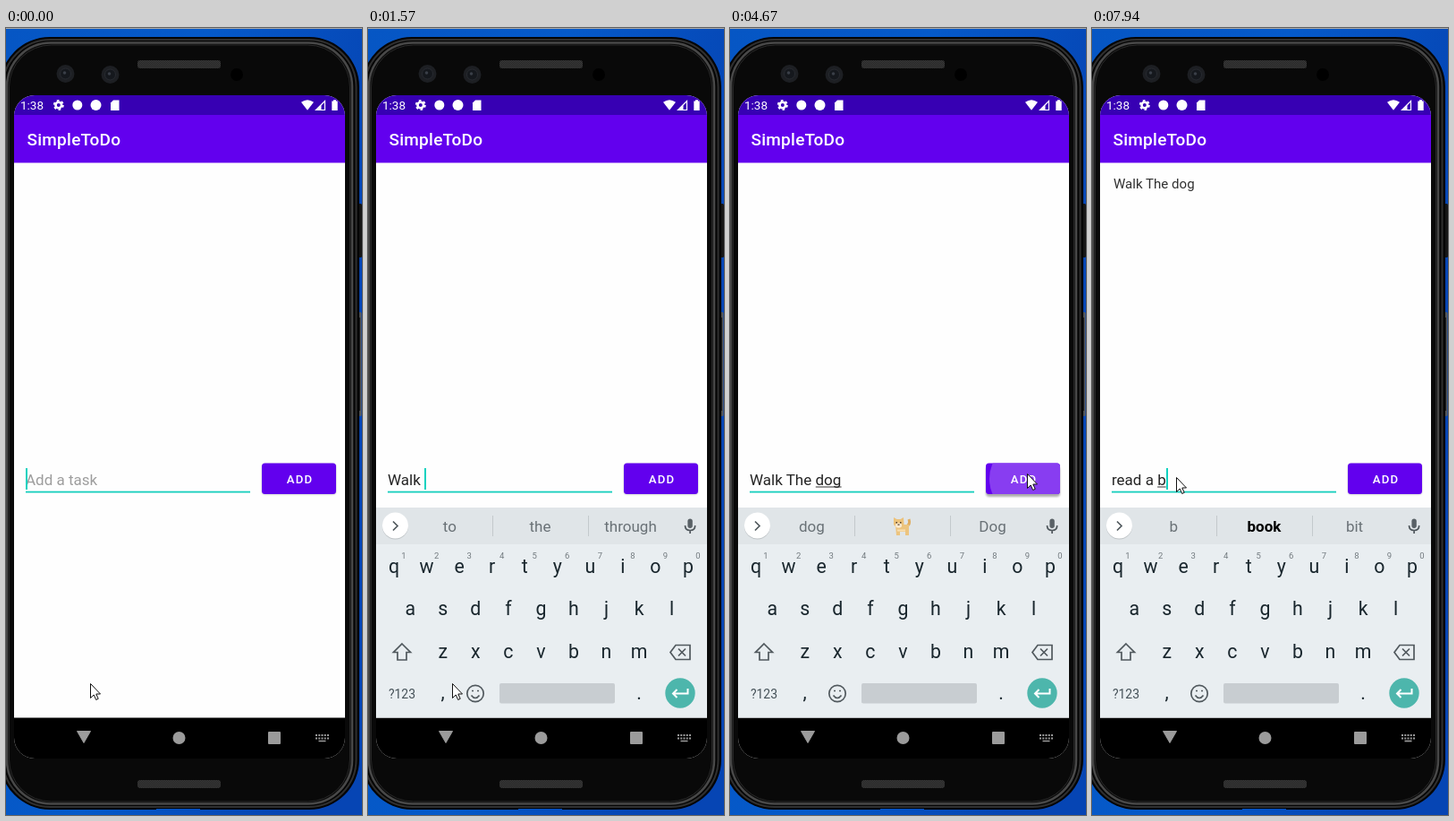
Animation, 398 px wide and 878 px high, one loop 8 s. Source, as an HTML page:

```html
<!DOCTYPE html>
<html lang="en">
<head>
<meta charset="utf-8">
<title>To-do app</title>
<style>
  html, body { margin: 0; width: 100%; height: 100%; overflow: hidden; background: #0a50c4; }
  svg { display: block; width: 398px; height: 878px; }
  text { font-family: Roboto, "Noto Sans", sans-serif; white-space: pre; }
  .mid { text-anchor: middle; }
  .line { fill: none; stroke: #50585d; stroke-width: 1.7; }
  .word { font-size: 17px; fill: #697176; text-anchor: middle; }
  .word.top { fill: #000; font-weight: 700; }
  .key { font-size: 21.3px; fill: #19262d; text-anchor: middle; }
  .digit { font-size: 9.5px; fill: #727a7f; text-anchor: middle; }
</style>
</head>
<body>
<svg viewBox="0 0 398 878">
  <defs>
    <linearGradient id="desk" x2="1" y2=".35">
      <stop stop-color="#0656c4"/><stop offset=".5" stop-color="#055aca"/><stop offset="1" stop-color="#0645b4"/>
    </linearGradient>
    <pattern id="mesh" width="2" height="2" patternUnits="userSpaceOnUse">
      <rect width="2" height="2" fill="#242424"/><path d="M0 0h1v1H0zM1 1h1v1H1z" fill="#3b3b3b"/>
    </pattern>
    <clipPath id="screen"><rect x="9" y="75" width="370" height="740" rx="23"/></clipPath>
    <clipPath id="buttonClip"><rect x="286" y="485.5" width="83" height="34.5" rx="3.5"/></clipPath>
    <filter id="soft" x="-20%" y="-40%" width="140%" height="200%"><feGaussianBlur stdDeviation="1.2"/></filter>
  </defs>

  <rect width="398" height="878" fill="url(#desk)"/>
  <rect width="398" height="1" fill="#a9a9a9"/>

  <!-- Phone body -->
  <rect x="393" y="196" width="5" height="60" rx="1.5" fill="#161616"/>
  <rect x="393" y="317" width="4.5" height="116" rx="1.5" fill="#55585a"/>
  <rect x="393" y="323" width="3" height="104" fill="#222"/>
  <path d="M49 10H339a56 56 0 0 1 56 56V816a56 56 0 0 1-56 56H217v-1H168v1H49a56 56 0 0 1-56-56V66a56 56 0 0 1 56-56" fill="#050505"/>
  <rect x="-3.500" y="13" width="395" height="856" rx="53" fill="none" stroke="#303030" stroke-width="2"/>
  <rect x="1" y="16.500" width="386" height="849" rx="49" fill="#0a0a0a" stroke="#484848" stroke-width="2.600"/>
  <rect x="3.500" y="19" width="381" height="844" rx="47" fill="#090909" stroke="#292929"/>
  <rect x="147" y="36" width="93" height="9" rx="3" fill="url(#mesh)"/>
  <rect x="147" y="839" width="93" height="9" rx="3" fill="url(#mesh)"/>
  <g id="lenses"></g>
  <circle cx="258" cy="52" r="7" fill="#000"/>

  <g clip-path="url(#screen)">
    <rect x="9" y="75" width="370" height="740" fill="#fefefe"/>
    <rect x="9" y="97" width="370" height="53.400" fill="#6200ee"/>
    <rect x="9" y="75" width="370" height="22" fill="#3700b3"/>
    <text x="16" y="91" font-size="13.500" fill="#fff">1:38</text>
    <g fill="#fff">
      <circle cx="58.800" cy="86" r="3.300" fill="none" stroke="#fff" stroke-width="2.600"/>
      <circle cx="58.800" cy="86" r="5.100" fill="none" stroke="#fff" stroke-width="1.800" stroke-dasharray="2.670"/>
      <circle cx="79.800" cy="86" r="5.500"/>
      <circle cx="100.500" cy="86" r="6"/>
      <path d="M120 80.500h6.500v11.500H117v-8.500z"/>
      <path d="M330 82.800q7-5 14 0l-7 9z"/>
      <path d="M346.500 91.500l10-10v10z" fill="none" stroke="#fff" stroke-width="1.200"/>
      <path d="M347 91.500l5.500-5.500v5.500z"/>
      <path d="M364.300 81.500h1.700v-1.300h3v1.300h1.700v10.500h-6.400z"/>
    </g>
    <text x="23.500" y="131" font-size="19" font-weight="500" letter-spacing=".24" fill="#fff">SimpleToDo</text>

    <text id="item" x="24" y="178.500" font-size="15.070" fill="#303030">Walk The dog</text>

    <!-- Entry field -->
    <rect id="flash" x="62.500" y="492" width="33" height="23" fill="#e5f7f4"/>
    <text id="hint" x="22" y="510" font-size="17" fill="#9d9d9d">Add a task</text>
    <text id="field" x="22" y="510" font-size="17" fill="#242424"></text>
    <rect id="compose" y="511.500" height="1" fill="#333"/>
    <rect x="22" y="516.700" width="251" height="1.800" fill="#16cebd"/>
    <rect id="caret" y="491" width="2" height="24" fill="#10d2c0"/>

    <!-- Add button -->
    <rect id="shadow" x="286" y="486.500" width="83" height="34" rx="4" fill="#000" filter="url(#soft)"/>
    <rect x="286" y="485.500" width="83" height="34.500" rx="3.500" fill="#6200ee"/>
    <g id="ripple" clip-path="url(#buttonClip)"><circle cx="333" cy="503" r="43" fill="#883df1"/></g>
    <text x="313.800" y="507.700" font-size="13.200" font-weight="500" letter-spacing="1.180" fill="#fff">ADD</text>

    <rect x="9" y="769.500" width="370" height="46" fill="#000"/>

    <g id="keyboard">
      <rect x="9" y="535" width="370" height="234.500" fill="#e9eef1"/>
      <rect x="9" y="535" width="370" height="41" fill="#e0e5e8"/>
      <circle cx="30.500" cy="556" r="14.500" fill="#bfc4c7"/>
      <circle cx="30.500" cy="555" r="14.500" fill="#fff"/>
      <path id="chevron" class="line"/>
      <rect x="357.400" y="547.500" width="5.400" height="10.500" rx="2.700" fill="#596166"/>
      <path class="line" d="M354.500 555q0 5.500 5.600 5.500t5.600-5.500M360.100 560v4" stroke-width="1.600"/>

      <g id="words">
        <path d="M139.500 544v23M246.500 544v23" stroke="#c3c9cc"/>
        <text id="word0" class="word" x="91.300" y="562"></text>
        <text id="word1" class="word" x="192.500" y="562"></text>
        <text id="word2" class="word" x="293.500" y="562"></text>
        <g id="dog">
          <path d="M197 556q5-2 3-8" fill="none" stroke="#e0ae62" stroke-width="3"/>
          <path d="M185 554h15v12h-4v-4h-6v4h-4z" fill="#ecc47f"/>
          <path d="M183 546l3.500 2h4l3.500-2 .5 8-4 4.500h-3.500l-4-4.500z" fill="#ecc27a"/>
          <ellipse cx="188.500" cy="555" rx="3.600" ry="2.800" fill="#fbead0"/>
          <path d="M185.500 551h1.500v1.500h-1.500zM190 551h1.500v1.500H190zM187.500 553.500h2v1.300h-2z" fill="#513a28"/>
          <path d="M187 560.500h9" stroke="#f8dfb2" stroke-width="2"/>
        </g>
      </g>

      <g id="tools">
        <circle class="line" cx="78" cy="554" r="5"/>
        <path class="line" d="M81.700 557.700l6 6" stroke-width="2.200"/>
        <path class="line" d="M126 549.500q0-1.500 1.500-1.500h11.500q1.500 0 1.500 1.500v8l-5 5h-8q-1.500 0-1.500-1.500zM135.500 562v-4.500h5M129.500 556q3 4 6 1.500M130 552h1.500M135 552h1.500" stroke-width="1.500"/>
        <text class="mid" x="186.800" y="560" font-size="13" font-weight="900" letter-spacing=".5" fill="#596166">GIF</text>
        <rect x="234" y="548" width="15" height="15" rx="1.500" fill="#697176"/>
        <path d="M274.500 545v21" stroke="#c3c9cc"/>
        <path d="M302 555.500h.01M307.700 555.500h.01M313.400 555.500h.01" stroke="#596166" stroke-width="3.800" stroke-linecap="round"/>
      </g>

      <g id="keys"></g>
      <path class="line" d="M38 687l9.500 9.500H43v8.500H33v-8.500h-4.500z"/>
      <path class="line" d="M344 688.500h16v16h-16l-6-8zM347 692.500l8 8M355 692.500l-8 8"/>
      <text class="mid" x="38" y="747.500" font-size="14" fill="#455158">?123</text>
      <text class="key" x="83.500" y="748">,</text>
      <circle class="line" cx="120" cy="742.500" r="9.200"/>
      <path class="line" d="M115.500 744.500q4.500 6 9 0M116 739.500h2M122 739.500h2"/>
      <rect x="147" y="731" width="129" height="22.500" rx="2" fill="#c8cdd1"/>
      <text class="key" x="303" y="749">.</text>
      <circle cx="349" cy="742" r="16.700" fill="#4db6ac"/>
      <path class="line" d="M357.500 737v5.500h-16M345.500 738l-4.500 4.500 4.500 4.500" style="stroke:#fff;stroke-width:2"/>
    </g>

    <g fill="#9b9b9b">
      <path d="M79.500 784.500h15l-7.500 13z" stroke="#9b9b9b" stroke-linejoin="round"/>
      <circle cx="193.500" cy="792" r="7"/>
      <rect x="293" y="785" width="14" height="14" rx="1"/>
      <path d="M346 789h15M346 792.500h15" stroke="#9b9b9b" stroke-width="2" stroke-dasharray="2 1.250"/>
      <path d="M349.500 795.500h8" stroke="#9b9b9b" stroke-width="1.700"/>
    </g>
  </g>

  <path id="mouse" d="M.5.500v16l3.700-3.500 2.500 5.500 2.500-1.200-2.400-5.300h4.700z" fill="#fff" stroke="#111"/>
</svg>
<script>
  const LOOP = 8000;
  const $ = id => document.getElementById(id);
  const show = (id, opacity) => $(id).setAttribute('opacity', +opacity);
  const place = (id, x, y) => $(id).setAttribute('transform', `translate(${x} ${y})`);

  const ruler = document.createElement('canvas').getContext('2d');
  const widthOf = text => {
    ruler.font = '17px Roboto, "Noto Sans", sans-serif';
    return ruler.measureText(text).width;
  };

  $('lenses').innerHTML = [[66.5, 51], [116.5, 52]].map(([x, y]) =>
    `<circle cx="${x}" cy="${y}" r="10" fill="#1d1f23"/>
     <circle cx="${x}" cy="${y}" r="6" fill="#15181d" stroke="#282b31"/>
     <circle cx="${x - 1}" cy="${y - 1}" r="1.8" fill="#3a3f48"/>`).join('');

  const rows = [['qwertyuiop', 29, 607.5], ['asdfghjkl', 47.2, 654.5], ['zxcvbnm', 83.7, 702.5]];
  $('keys').innerHTML = rows.map(([letters, x0, y], row) => [...letters].map((letter, i) => {
    const x = x0 + i * 36.55;
    const digit = row ? '' : `<text class="digit" x="${x + 11}" y="592">${(i + 1) % 10}</text>`;
    return `<text class="key" x="${x}" y="${y}">${letter}</text>${digit}`;
  }).join('')).join('');

  // Each cue changes part of the state; `from` is where the underlined word starts.
  const type = (text, strip) => ({ text, strip, from: text.lastIndexOf(' ') + 1, caret: 1 });
  const cues = [
    [0, { ...type('', 'tools'), keys: 0, drop: 0, flash: 0, press: 0, item: 0, mouse: [94, 731] }],
    [280, { keys: .8, drop: 45 }],
    [400, { keys: .97, drop: 0 }],
    [550, { ...type('W', 'W|What|We'), keys: 1 }],
    [670, type('Wa', 'Wa|Walk|Was')],
    [1200, type('Wal', 'Wal|Walk|Wall')],
    [1450, type('Walk', 'Walk|Walking|Walks')],
    [1570, type('Walk ', 'to|the|through')],
    [1690, type('Walk T', 'T|The|To')],
    [1810, type('Walk Th', 'Th|The|This')],
    [1930, type('Walk The', 'Thr|The|There')],
    [2200, { ...type('Walk The ', 'walking|courier|proposal'), flash: 1 }],
    [2320, { flash: .5 }],
    [2440, { flash: 0 }],
    [2560, type('Walk The d', 'd|dog|day')],
    [2850, type('Walk The do', 'do|dog|door')],
    [2970, type('Walk The dog', 'dog||Dog')],
    [3500, { caret: 0 }],
    [3620, { mouse: [112, 744] }],
    [3870, { mouse: [172, 690] }],
    [3990, { mouse: [275, 560], caret: 1 }],
    [4110, { mouse: [332, 501] }],
    [4260, { mouse: [332, 497] }],
    [4410, { caret: 0 }],
    [4670, { press: 1 }],
    [4790, { ...type('', 'dog||Dog'), press: .5, item: .45 }],
    [4940, { strip: '', press: 0, item: 1 }],
    [5080, { strip: 'tools', mouse: [322, 506] }],
    [5200, { mouse: [282, 512], caret: 0 }],
    [5350, { mouse: [200, 516] }],
    [5475, { mouse: [140, 513] }],
    [5600, { mouse: [104, 506] }],
    [5750, { mouse: [94, 501], caret: 1 }],
    [6170, { caret: 0 }],
    [6710, { caret: 1 }],
    [6990, type('r', 'r|are|right')],
    [7140, type('re', 're|are|ready')],
    [7280, type('rea', 'rea|read|ready')],
    [7400, type('read', 'read|ready|reading')],
    [7520, type('read ', 'a|the|it')],
    [7690, type('read a ', 'book|lot|few')],
    [7940, type('read a b', 'b|book|bit')]
  ];
  const states = [];
  for (const [time, change] of cues) states.push({ ...states.at(-1), ...change, time });

  function draw(s) {
    $('field').textContent = s.text;
    show('hint', !s.text);
    const end = widthOf(s.text);
    const start = widthOf(s.text.slice(0, s.from));
    $('compose').setAttribute('x', 22 + start);
    $('compose').setAttribute('width', Math.max(0, end - start));
    $('caret').setAttribute('x', Math.round(22 + end));
    show('caret', s.caret);
    show('flash', s.flash);

    show('keyboard', s.keys);
    place('keyboard', 0, s.drop);
    const tools = s.strip === 'tools';
    const words = tools ? [] : s.strip.split('|');
    show('tools', tools);
    show('words', words.length === 3);
    for (let i = 0; i < 3; i++) $('word' + i).textContent = words[i] || '';
    // Only a completion of the current word is bold, not a prediction of the next one.
    $('word1').classList.toggle('top', !s.text.endsWith(' '));
    show('dog', words[1] === '');
    $('chevron').setAttribute('d', tools ? 'M33 550.500l-5 5 5 5' : 'M28 550.500l5 5-5 5');

    show('item', s.item);
    show('ripple', s.press);
    show('shadow', .22 + s.press * .1);
    place('shadow', 0, s.press * 2.5);
    place('mouse', ...s.mouse);
  }

  let current;
  function frame() {
    const time = performance.now() % LOOP;
    const next = states.findLast(s => s.time <= time);
    if (next !== current) draw(current = next);
    requestAnimationFrame(frame);
  }
  frame();
</script>
</body>
</html>
```
